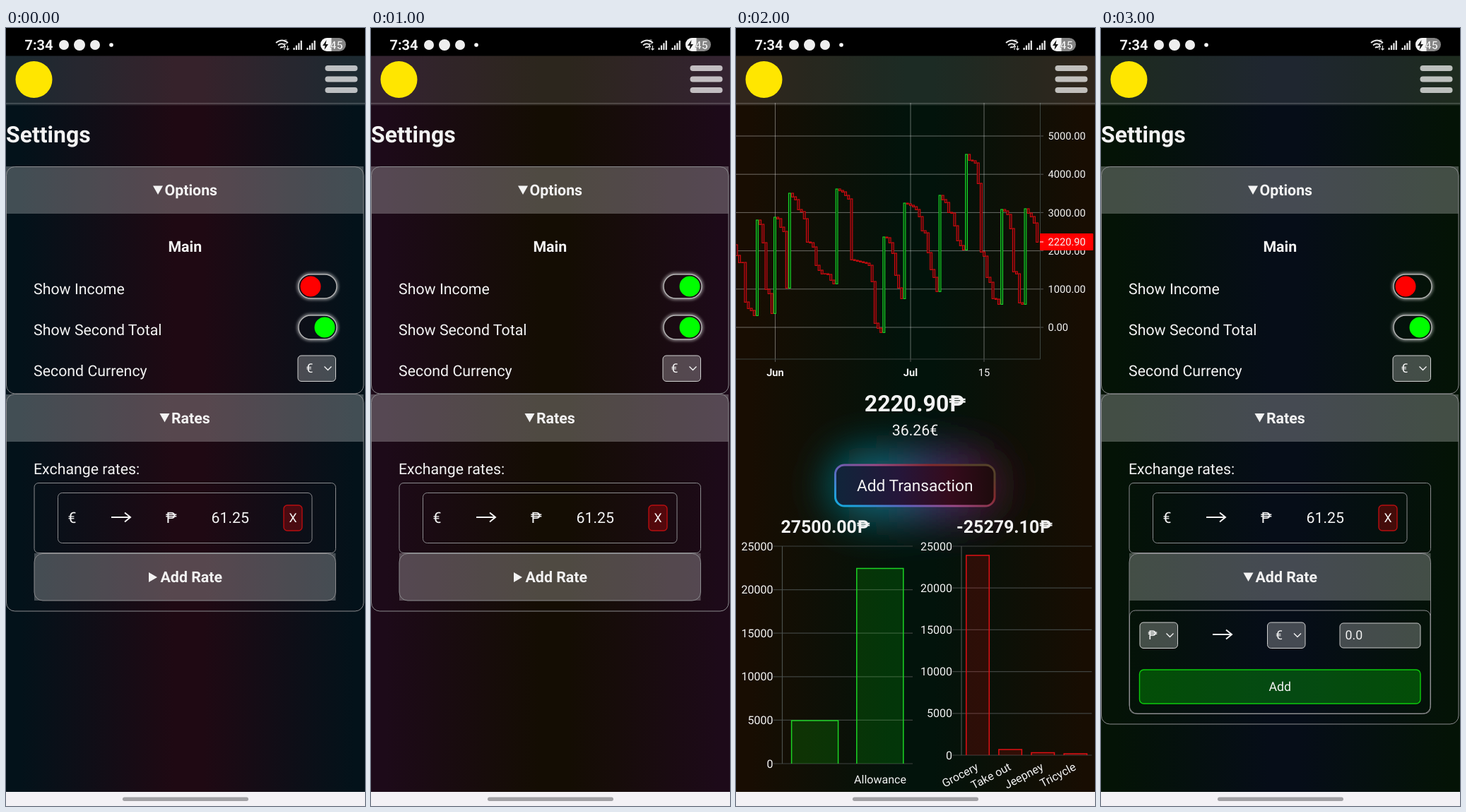
Animation, 508 px wide and 1102 px high, one loop 4000 ms. Source, as an HTML page:

```html
<!DOCTYPE html>
<html lang="en">
<head>
<meta charset="utf-8">
<title>Budget app</title>
<style>
  html, body { margin: 0; width: 100%; height: 100%; overflow: hidden; background: #000; }
  svg { display: block; width: 100%; height: 100%; }
  text { font-family: Roboto, sans-serif; fill: #f3f3f3; text-rendering: geometricPrecision; }
</style>
</head>
<body>
<svg id="stage" viewBox="0 0 508 1102" preserveAspectRatio="none"></svg>
<script>
const EDGE = '#8b8b8e', GLASS = 'rgba(255,255,255,.25)', BODY = 21.33;

const scenes = [
  { edge: '#03121a', mid: '#1f0913', income: false, page: 'settings', form: false },
  { edge: '#1d0a19', mid: '#140d03', income: true, page: 'settings', form: false },
  { edge: '#180d02', mid: '#02130b', page: 'overview' },
  { edge: '#041306', mid: '#060d18', income: false, page: 'settings', form: true }
];

const attrs = o => Object.entries(o).map(([k, v]) => ` ${k}="${v}"`).join('');
const text = (s, x, y, size = BODY, more = {}) =>
  `<text x="${x}" y="${y}" font-size="${size}"${attrs(more)}>${s}</text>`;
const bold = (s, x, y, size = BODY, more = {}) => text(s, x, y, size, { 'font-weight': 700, ...more });
const box = (x, y, x2, y2, rx, fill, stroke = 'none', more = {}) =>
  `<rect x="${x}" y="${y}" width="${x2 - x}" height="${y2 - y}" rx="${rx}" fill="${fill}" stroke="${stroke}"${attrs(more)}/>`;
const path = (d, stroke, width = 1, fill = 'none') =>
  `<path d="${d}" stroke="${stroke}" stroke-width="${width}" fill="${fill}"/>`;
const dot = (x, y, r, fill, more = {}) => `<circle cx="${x}" cy="${y}" r="${r}" fill="${fill}"${attrs(more)}/>`;
const group = (id, inner) => `<g id="${id}">${inner}</g>`;
const middle = { 'text-anchor': 'middle' }, end = { 'text-anchor': 'end' };

const downMark = (x, y) => path(`M${x} ${y}h14l-7 12.5z`, 'none', 0, '#f3f3f3');
const rightMark = (x, y) => path(`M${x} ${y}v14l12-7z`, 'none', 0, '#f3f3f3');
const arrow = (x, y) => path(`M${x} ${y}h27m-8-6.5l8 6.5l-8 6.5`, '#f3f3f3', 2);
const select = (x, y, sign) =>
  box(x + .5, y + .5, x + 54, y + 37, 5, GLASS, '#d0d0d0') +
  text(sign, x + 12, y + 24.5, 17.8) +
  path(`M${x + 38} ${y + 16}l5 5l5-5`, '#f3f3f3', 1.4);

function toggle(y, id) {
  const track = [414, y - 17, 468, y + 17, 17];
  return box(...track, 'none', '#fff', { 'stroke-width': 3.5, opacity: .65, filter: 'url(#halo)' }) +
    box(...track, 'url(#page)', '#b4b4b4', { 'stroke-width': 1.4 }) +
    dot(451, y, 14.5, '#0f0', { id });
}

const defs = `<defs>
  <linearGradient id="page" gradientUnits="userSpaceOnUse" x1="0" y1="0" x2="508" y2="0">
    <stop class="edge" offset=".04"/><stop class="mid" offset=".47"/><stop class="mid" offset=".55"/><stop class="edge" offset=".97"/>
  </linearGradient>
  <linearGradient id="rim" x1="0" y1=".8" x2="1" y2=".3">
    <stop offset="0" stop-color="#1ca4dc"/><stop offset=".28" stop-color="#6263bd"/><stop offset=".52" stop-color="#9b4a86"/>
    <stop offset=".8" stop-color="#84292e"/><stop offset="1" stop-color="#56422a"/>
  </linearGradient>
  <linearGradient id="face">
    <stop offset="0" stop-color="#10253a"/><stop offset=".4" stop-color="#25163a"/><stop offset=".72" stop-color="#350b1c"/><stop offset="1" stop-color="#1d0b0c"/>
  </linearGradient>
  <linearGradient id="aura">
    <stop offset="0" stop-color="#00555a"/><stop offset=".35" stop-color="#126273"/><stop offset=".6" stop-color="#3c2e62"/><stop offset="1" stop-color="#450e1c"/>
  </linearGradient>
  <filter id="halo" x="-30%" y="-50%" width="160%" height="200%"><feGaussianBlur stdDeviation="2.2"/></filter>
  <filter id="glow" x="-60%" y="-150%" width="220%" height="400%"><feGaussianBlur stdDeviation="27"/></filter>
  <linearGradient id="lip" x1="0" y1="0" x2="0" y2="1">
    <stop offset="0" stop-color="#fff" stop-opacity=".32"/><stop offset="1" stop-color="#fff" stop-opacity="0"/>
  </linearGradient>
</defs>`;

function signal(x) {
  let s = '';
  for (let i = 0; i < 4; i++) s += box(x + i * 3.4, 28 - i * 3.4, x + i * 3.4 + 2.2, 31, .5, '#e8e8e8');
  return s;
}

function chrome() {
  let s = box(0, 0, 508, 39.5, 0, '#000') + bold('7:34', 26.5, 31, 20) +
    dot(82, 24, 7, '#eee') + dot(104, 24, 8, '#eee') + dot(126, 24, 7, '#eee') + dot(149, 24, 2.8, '#fff');
  s += path('M382 21q8.500-7 17 0M385 24.500q5.500-4.500 10 0M388 28q2.500-2 4 0', '#e8e8e8', 1.8) +
    text('5', 393, 23, 9) + path('M394 31v-6m-2 2l2-2l2 2M398.500 25v6m-2-2l2 2l2-2', '#e8e8e8', 1.1);
  s += signal(406.5) + signal(425.5);
  s += box(445, 14, 481, 33, 9.5, '#858585') +
    path('M454.500 14h6v19h-6a9.500 9.500 0 0 1 0-19z', 'none', 0, '#f4f4f4') +
    path('M453.500 17l-5.500 8h3.500l-1 6l5.500-8h-3.500z', 'none', 0, '#111') +
    bold('45', 458.5, 29.5, 16, { fill: '#fff', stroke: '#666', 'stroke-width': .4 });
  s += box(0, 39.5, 508, 106, 0, 'rgba(255,255,255,.1)') + box(0, 106, 508, 110, 0, 'url(#lip)');
  s += dot(39.5, 73, 26, '#ffe600');
  for (const y of [53, 68.5, 84]) s += box(451.5, y, 497.5, y + 8, 4, 'rgba(255,255,255,.7)');
  return s + box(0, 1082, 508, 1102, 0, '#f3f1f5') + box(165, 1089.5, 343, 1095, 2.7, '#a2a1a5');
}

function settings() {
  let s = bold('Settings', 0, 161.5, 32);
  s += box(0, 196, 506, 263, 0, GLASS) + box(.5, 196.5, 506, 518, 12, 'none', EDGE) +
    downMark(208, 223.5) + bold('Options', 224.5, 237) + bold('Main', 253.3, 317, BODY, middle);
  s += text('Show Income', 39, 377) + text('Show Second Total', 39, 435) + text('Second Currency', 39, 493);
  s += toggle(366, 'income') + toggle(424, 'total') + select(412.5, 463.5, '€');
  s += box(0, 519, 506, 586, 0, GLASS) + downMark(217.5, 546) + bold('Rates', 234, 559.5);
  s += text('Exchange rates:', 39, 632) + box(40, 644.5, 466.5, 743.5, 6, 'none', EDGE) +
    box(73.5, 658.5, 433, 729.5, 6, 'none', EDGE);
  s += text('€', 87.5, 701) + arrow(149, 693) + text('₱', 226, 701) + text('61.25', 290.5, 701);
  s += box(393, 676, 419, 712, 5, 'rgba(255,0,0,.25)', '#b80e10', { 'stroke-width': 1.4 }) +
    text('X', 406, 700, 17.8, { ...middle, fill: '#e01012' });
  s += box(40, 744, 466.5, 811, 0, GLASS) + bold('Add Rate', 218.5, 785);
  s += group('closed', rightMark(202, 771) + box(40, 744.5, 466.5, 811, 12, 'none', EDGE) +
    box(.5, 518.5, 506, 826, 12, 'none', EDGE));
  s += group('open', downMark(201.5, 771.5) + box(40, 744.5, 466.5, 971.5, 12, 'none', EDGE) +
    box(40.5, 825, 466, 971, 8, 'none', EDGE) + box(.5, 518.5, 506, 986, 12, 'none', EDGE) +
    select(54.5, 841.5, '₱') + arrow(158, 859) + select(235, 841.5, '€') +
    box(338, 843, 452, 878, 5, GLASS, '#c4c4c4') + text('0.0', 345.5, 866, 17.8, { fill: '#777c79' }) +
    box(54.5, 909, 452, 957, 6, 'rgba(0,255,0,.25)', '#0ccc0c', { 'stroke-width': 1.4 }) +
    text('Add', 253.3, 939, 17.8, { ...middle, fill: '#0f0' }));
  return s;
}

// Close levels of each falling run; a run opens with a rise.
const runs = [
  [322, 332, 332, 388, 397, 400, 407],
  [272, 278, 304, 370, 376, 404],
  [268, 270, 282, 288, 368],
  [234, 239, 243, 257, 260, 270, 303, 304, 310, 336, 343, 348, 348, 349, 357, 362],
  [228, 230, 232, 237, 242, 328, 329, 330, 331, 332, 333, 336, 359, 418, 425, 431],
  [296, 297, 304, 319, 350, 368, 383],
  [248, 249, 251, 253, 257, 267, 287, 290, 318, 342, 353, 373],
  [237, 243, 247, 261, 262, 280, 301, 308, 314],
  [179, 187, 188, 191, 220, 317, 323, 353, 360, 383, 384, 391],
  [257, 259, 264, 284, 345, 348, 389, 391],
  [256, 262, 267, 276, 303]
];

function candles() {
  let s = '', last = 307, x = .8;
  for (const close of runs.flat()) {
    const rise = close < last;
    s += box(x - 1.4, Math.min(last, close), x + 1.4, Math.max(last, close) + .4, 0,
      rise ? '#06350c' : '#30080a', rise ? '#18d828' : '#d40c10', { 'stroke-width': 1.1 });
    last = close;
    x += 4.17;
  }
  return s;
}

function history() {
  const grid = 'rgba(255,255,255,.38)', ink = { fill: '#e9e9bd' };
  let s = '';
  for (let i = 0; i <= 5; i++) {
    const y = 424 - i * 54.2;
    s += path(`M0 ${y}H430`, grid) + path(`M430 ${y}h5`, '#555') +
      text(i ? i + '000.00' : '0.00', 441.5, y + 5.2, 14.67, ink);
  }
  for (const x of [55.5, 247, 351]) s += path(`M${x} 106V469`, grid) + path(`M${x} 469v4`, '#555');
  s += candles() + path('M0 469H430.500V106', '#3c4540');
  s += box(430, 291, 505.5, 315, 1, '#f00') + path('M430 303h5', '#fff') + text('2220.90', 441.5, 308.3, 14.67, { fill: '#fff' });
  return s + bold('Jun', 55.5, 493, 14.67, { ...middle, ...ink }) +
    bold('Jul', 247, 493, 14.67, { ...middle, ...ink }) + text('15', 351, 493, 14.67, { ...middle, ...ink });
}

function barChart({ axis, right, base, step, slot, wide, tops, stroke, fill }) {
  let s = '';
  for (let i = 0; i <= 5; i++) {
    const y = base - i * step;
    s += path(`M${axis - 13} ${y}H${right}`, '#3f4340', 1.2) + text(i * 5000, axis - 13, y + 5.5, 16, { ...end, fill: '#dcdcdc' });
  }
  s += path(`M${axis} ${base - 5 * step}V${base}`, '#4a504c', 1.2);
  tops.forEach((top, i) => {
    const x = axis + slot * (i + .5) - wide / 2;
    s += path(`M${x} ${base}V${top}h${wide}V${base}`, stroke, 1.5, fill);
  });
  return s;
}

function overview() {
  const green = { ...middle, fill: '#0cf00c' }, red = { ...middle, fill: '#f00c0c' };
  let s = box(128, 595, 380, 700, 50, 'url(#aura)', 'none', { filter: 'url(#glow)' }) + history();
  s += bold('2220.90₱', 253.5, 543, 32, green) + text('36.26€', 253.5, 577, BODY, green);
  s += box(140.5, 619, 366, 677, 13, 'url(#face)', 'url(#rim)', { 'stroke-width': 3 }) +
    text('Add Transaction', 253.3, 656, 22.67, { ...middle, fill: '#fff' });
  s += bold('27500.00₱', 126.5, 715, 24.96, green) + bold('-25279.10₱', 380, 715, 24.96, red);
  s += barChart({ axis: 65.5, right: 250, base: 1042, step: 61.6, slot: 92.2, wide: 66,
    tops: [981, 765.5], stroke: '#1cd424', fill: 'rgba(0,255,0,.15)' });
  s += barChart({ axis: 319, right: 503.5, base: 1030, step: 59.2, slot: 46.1, wide: 32.5,
    tops: [747, 1022, 1026.5, 1028], stroke: '#e01014', fill: 'rgba(255,0,0,.15)' });
  s += text('Allowance', 204, 1070, 16, middle);
  ['Grocery', 'Take out', 'Jeepney', 'Tricycle'].forEach((name, i) => {
    const x = 344 + i * 46.1;
    s += text(name, x, 1050, 16, { ...end, transform: `rotate(-28 ${x} 1050)` });
  });
  return s;
}

const stage = document.getElementById('stage');
stage.innerHTML = defs + box(0, 0, 508, 1102, 0, 'url(#page)') +
  group('settings', settings()) + group('overview', overview()) + chrome();

const $ = id => document.getElementById(id);
const show = (id, on) => $(id).setAttribute('display', on ? 'inline' : 'none');
let current;

function draw(ms) {
  const scene = scenes[Math.floor(ms % 4000 / 1000)];
  if (scene === current) return;
  current = scene;
  for (const part of ['edge', 'mid'])
    stage.querySelectorAll('.' + part).forEach(stop => stop.setAttribute('stop-color', scene[part]));
  show('settings', scene.page === 'settings');
  show('overview', scene.page === 'overview');
  show('open', scene.form);
  show('closed', !scene.form);
  $('income').setAttribute('cx', scene.income ? 451 : 431);
  $('income').setAttribute('fill', scene.income ? '#0f0' : '#f00');
}

const start = performance.now();
function tick() {
  draw(performance.now() - start);
  requestAnimationFrame(tick);
}
tick();
</script>
</body>
</html>
```
